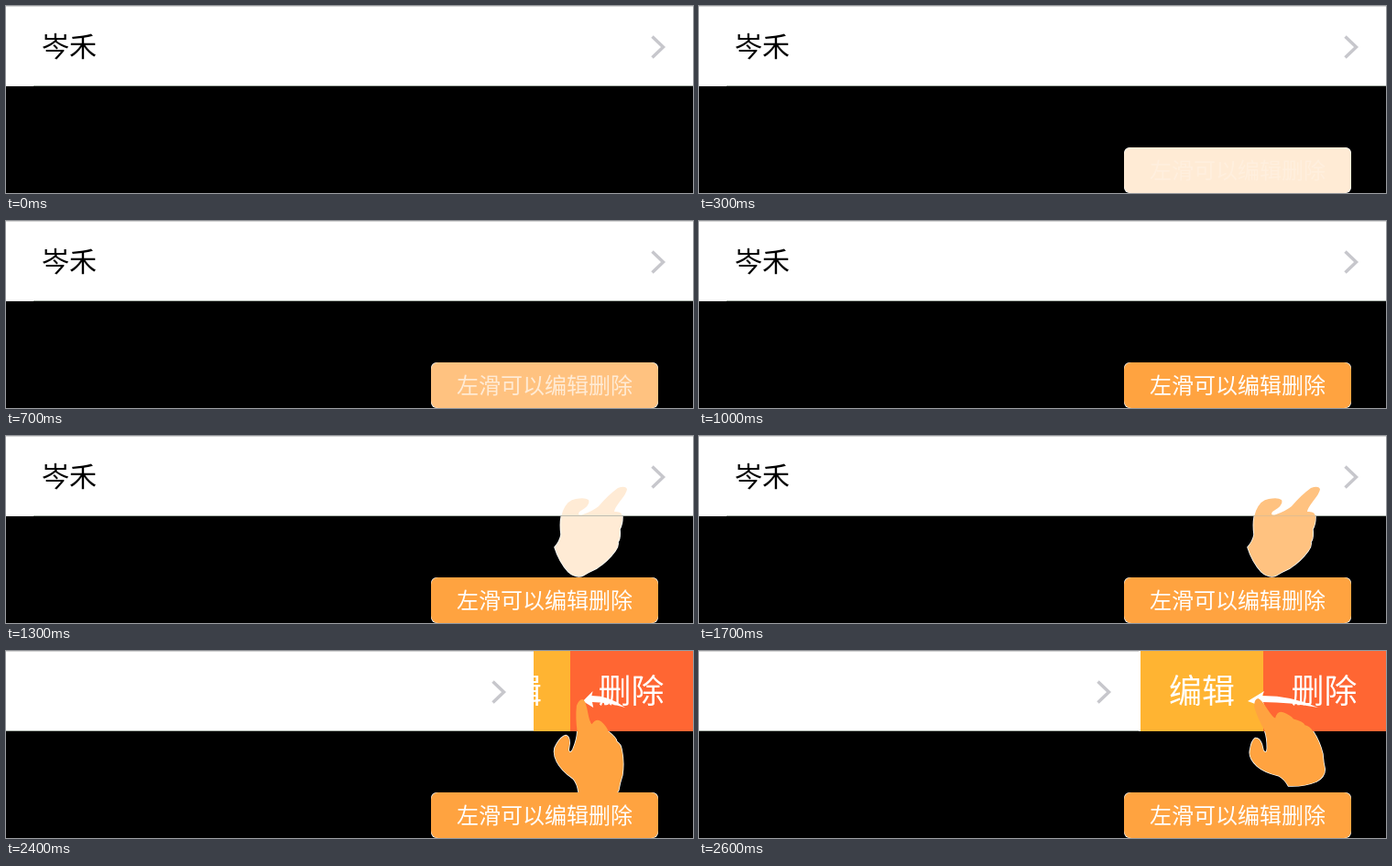
An HTML page with a canvas for the animation above (3100 ms loop, 750 by 205 pixels).

```html
<!DOCTYPE html>
<html lang="zh">
<head>
<meta charset="utf-8">
<style>
  html, body { margin: 0; width: 100%; height: 100%; overflow: hidden; background: #000; }
  canvas { display: block; }
</style>
</head>
<body>
<canvas id="stage" width="750" height="205"></canvas>
<script>
const ctx = document.getElementById('stage').getContext('2d');
const LOOP = 3100, STEP = 100, ROW = 88;
const ORANGE = [255, 163, 64];
const HAIRLINE = '#a8b0a8';

// Drawn in its starting pose; the fingertip is the anchor.
const TIP = [674, 59];
const hand = new Path2D(`M668 57Q676 54 678 58Q678 62 670 72Q664 80 664 83Q673 82 673 89
  Q673 97 670 102Q671 113 668 116Q669 121 665 126Q657 137 645 145Q636 149 630 153
  Q622 156 614 149Q604 138 599 122Q605 115 606 108Q604 92 608 82Q613 70 622 69
  Q632 67 636 70Q638 74 632 79L626 83Q623 88 630 86Q641 82 647 77Q657 65 668 57Z`);
const arrow = new Path2D('M599 55L617 44L615 49Q648 49 676 62Q645 56 616 56L618 62Z');
const chevron = new Path2D('M705.5 33.5L717.5 45L705.5 56.5');

const clamp = v => Math.max(0, Math.min(1, v));
const lerp = (a, b, p) => a + (b - a) * p;
const tint = a => `rgb(${ORANGE.map(c => lerp(255, c, a)).join()})`;

function rect(color, x, y, w, h) {
  ctx.fillStyle = color;
  ctx.fillRect(x, y, w, h);
}

function roundRect(color, x, y, w, h, radius) {
  ctx.fillStyle = color;
  ctx.beginPath();
  ctx.roundRect(x, y, w, h, radius);
  ctx.fill();
}

function text(str, x, y, size, color, align = 'center') {
  ctx.font = `${size}px "Noto Sans CJK SC", "Noto Sans CJK", sans-serif`;
  ctx.textAlign = align;
  ctx.fillStyle = color;
  ctx.fillText(str, x, y);
}

function drawButtons() {
  rect('#ffb432', 482, 0, 134, ROW);
  rect('#ff6633', 616, 0, 134, ROW);
  text('编辑', 549, 57, 36, '#fff');
  text('删除', 682.5, 57, 36, '#fff');
}

function drawRow(shift) {
  ctx.save();
  ctx.translate(-shift, 0);
  rect('#fff', 0, 0, shift > 268 ? 752 : 750, ROW);
  rect('#d9d9d9', 0, 0, 750, 1);
  rect(HAIRLINE, 30, ROW - 1, 720, 1);
  text('岑禾', 39, 55, 30, '#000', 'left');
  ctx.strokeStyle = '#c7c7cc';
  ctx.lineWidth = 3.5;
  ctx.stroke(chevron);
  ctx.restore();
}

function drawArrow(p) {
  ctx.save();
  ctx.translate(676, 0);
  ctx.scale(p, 1);
  ctx.translate(-676, 0);
  ctx.fillStyle = '#fff';
  ctx.fill(arrow);
  ctx.restore();
}

function drawHand(alpha, x, y, degrees) {
  const paint = outlined => {
    ctx.save();
    if (outlined) {
      ctx.beginPath();
      ctx.rect(0, ROW, 750, 205 - ROW);
      ctx.clip();
    }
    ctx.translate(x, y);
    ctx.rotate(-degrees * Math.PI / 180);
    ctx.translate(-TIP[0], -TIP[1]);
    ctx.fillStyle = tint(alpha);
    ctx.strokeStyle = '#fff';
    ctx.lineWidth = 1.5;
    if (outlined) ctx.stroke(hand);
    else ctx.fill(hand);
    ctx.restore();
  };
  paint(true); // white fringe on the black area
  paint(false);
  // The row's hairline shows through while the hand fades in.
  if (alpha < 1) {
    ctx.globalAlpha = 1 - alpha;
    rect(HAIRLINE, 600, ROW - 1, 80, 1);
    ctx.globalAlpha = 1;
  }
}

function drawLabel(alpha) {
  roundRect('#fff', 464, 155, 248, 50, 6);
  roundRect(tint(alpha), 464, 155, 248, 50, 8);
  text('左滑可以编辑删除', 588, 188.5, 24, `rgba(255,255,255,${alpha})`);
}

function draw(time) {
  const tick = Math.floor(time % LOOP / STEP);
  const labelAlpha = clamp((tick - 1) / 9);
  const handAlpha = clamp((tick - 11) / 9);
  const swiping = tick >= 21;
  const p = clamp((tick - 21) / 5);

  rect('#000', 0, 0, 750, 205);
  drawButtons();
  drawRow(swiping ? lerp(30, 270, p) : 0);
  if (swiping) {
    drawArrow(p);
    drawHand(1, lerp(656, 610, p), lerp(58, 56, p), lerp(15, 70, p));
  } else if (handAlpha) {
    drawHand(handAlpha, ...TIP, 0);
  }
  if (labelAlpha) drawLabel(labelAlpha);
}

const start = performance.now();
function loop() {
  draw(performance.now() - start);
  requestAnimationFrame(loop);
}
loop();
</script>
</body>
</html>
```
